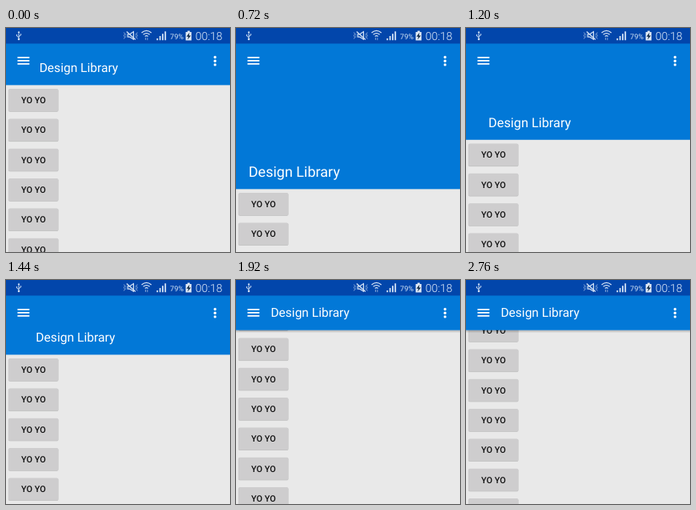
Recreate the animation shown at these times as an HTML page. Size 280 by 280 pixels, loop 2.88 s.

```html
<!DOCTYPE html>
<html lang="en">
<head>
<meta charset="utf-8">
<title>Collapsing toolbar</title>
<style>
  html, body { margin: 0; width: 100%; height: 100%; overflow: hidden; background: #e9e9e9; }
  svg { display: block; width: 100%; height: 100%; }
  text { font-family: Roboto, "Noto Sans", sans-serif; text-rendering: geometricPrecision; }
</style>
</head>
<body>
<svg viewBox="0 0 280 280">
  <defs>
    <linearGradient id="fade" x1="0" y1="0" x2="0" y2="1">
      <stop offset="0" stop-color="#000" stop-opacity=".24"/>
      <stop offset="1" stop-color="#000" stop-opacity="0"/>
    </linearGradient>
    <g id="button">
      <rect x="2.7" y="5.1" width="63" height="28.3" rx="2" fill="#000" opacity=".07"/>
      <rect x="3.1" y="5.3" width="62.2" height="28" rx="1.6" fill="#000" opacity=".13"/>
      <rect x="3.1" y="4.7" width="62.2" height="28" rx="1.6" fill="#cecdce"/>
      <text x="34.4" y="22.6" font-size="10.9" font-weight="500" text-anchor="middle" fill="#111">YO YO</text>
    </g>
  </defs>
  <rect width="280" height="280" fill="#e9e9e9"/>
  <g id="list"></g>

  <rect id="shadow" width="280" height="3.5" fill="url(#fade)"/>
  <rect id="bar" width="280" fill="#0278d7"/>
  <text id="title" fill="#fff">Design Library</text>
  <path d="M14.4 36.9H29.3M14.4 40.9H29.3M14.4 44.9H29.3" stroke="#fff" stroke-width="1.6"/>
  <g fill="#fff">
    <circle cx="261.3" cy="36.5" r="1.7"/>
    <circle cx="261.3" cy="41.2" r="1.7"/>
    <circle cx="261.3" cy="45.9" r="1.7"/>
  </g>

  <rect width="280" height="19.5" fill="#0246ab"/>
  <g fill="none" stroke="#d5e3f6" stroke-width="1">
    <!-- usb -->
    <path d="M16 5V14M16 11.8L13.4 10V8M16 10.6L18.6 9V7.2" stroke-width="1"/>
    <path d="M16 3.6L17.4 6H14.6Z" fill="#d5e3f6" stroke="none"/>
    <circle cx="16" cy="14" r="1.3" fill="#d5e3f6" stroke="none"/>
    <!-- muted, vibrating -->
    <path d="M147.4 5.5L148.6 7.5L147.4 9.5L148.6 11.5L147.4 13.5M164.2 5.5L163 7.5L164.2 9.5L163 11.5L164.2 13.5" stroke-width=".8" opacity=".8"/>
    <path d="M149.8 7V12M161.9 7V12" stroke-width=".7" opacity=".5"/>
    <path d="M152.2 7.8H154.6L159.4 4.6V14.2L154.6 11.2H152.2Z" stroke-width="1.2"/>
    <path d="M150.8 4.4L161.8 14.6" stroke-width="1.4"/>
    <!-- wifi -->
    <path d="M169.5 6Q175.6 .9 181.7 6M171.6 8.3Q175.6 5 179.6 8.3M173.7 10.4Q175.6 8.8 177.5 10.4" stroke-width="1.3"/>
    <path d="M174.4 12V15M176.8 15.2V12.2" stroke-width=".9" opacity=".7"/>
    <!-- signal -->
    <path d="M189.2 15.2V12.9M192.6 15.2V10M195.9 15.2V7.2M199.2 15.2V4.2" stroke-width="1.8"/>
  </g>
  <!-- battery -->
  <path d="M226.8 3.6H229.8V5H231.8V15.6H224.6V5H226.8Z" fill="#dfe8f5"/>
  <path d="M229.4 5.8L225.6 10.8H228L227 14.6L231 9.4H228.6Z" fill="#0b2440"/>
  <text x="205" y="13.5" font-size="9.2" fill="#d5e3f6">79%</text>
  <text x="236.8" y="14.9" font-size="13.9" font-weight="300" fill="#e6effb">00:18</text>
</svg>
<script>
const LOOP = 2880, STEP = 120;
const OPEN = 218.4, RANGE = 155.7, PITCH = 37.33, ROWS = 9;
// [time, distance dragged upwards]: first collapses the bar, then scrolls the list
const DRAG = [[0, 147], [360, 0], [960, 39], [1440, 125], [1920, 188],
              [2160, 190], [2400, 186], [2760, 174], [LOOP, 147]];

const $ = id => document.getElementById(id);
const list = $('list'), bar = $('bar'), shadow = $('shadow'), title = $('title');
const lerp = (a, b, k) => a + (b - a) * k;

for (let i = 0; i < ROWS; i++) {
  const use = document.createElementNS('http://www.w3.org/2000/svg', 'use');
  use.setAttribute('href', '#button');
  use.setAttribute('y', i * PITCH);
  list.append(use);
}

// Monotone cubic through the drag points, closed over the loop
const spans = DRAG.length - 1;
const slope = DRAG.slice(1).map(([t, d], i) => (d - DRAG[i][1]) / (t - DRAG[i][0]));
const tangent = i => {
  const a = slope[(i + spans - 1) % spans], b = slope[i % spans];
  return a * b > 0 ? 2 * a * b / (a + b) : 0;
};

function dragAt(t) {
  let i = 0;
  while (i < spans - 1 && t >= DRAG[i + 1][0]) i++;
  const [t0, d0] = DRAG[i], [t1, d1] = DRAG[i + 1];
  const w = t1 - t0, u = (t - t0) / w, v = 1 - u;
  return d0 * (1 + 2 * u) * v * v + d1 * (3 - 2 * u) * u * u
       + w * u * v * (tangent(i) * v - tangent(i + 1) * u);
}

function draw(t) {
  const drag = dragAt(t);
  const shift = Math.min(drag, RANGE);
  const bottom = OPEN - shift, k = shift / RANGE;
  bar.setAttribute('height', bottom);
  // The bar is raised only while fully collapsed
  shadow.setAttribute('y', bottom);
  shadow.setAttribute('opacity', k < 1 ? 0 : 1);
  list.setAttribute('transform', `translate(0 ${OPEN - drag})`);
  title.setAttribute('x', lerp(12.4, 43.4, k));
  title.setAttribute('y', lerp(203, 46.4, k));
  title.setAttribute('font-size', lerp(18.67, 15.55, 1 - (1 - k) ** 2));
}

const start = performance.now();
function tick() {
  const t = (performance.now() - start) % LOOP;
  draw(Math.floor(t / STEP) * STEP);
  requestAnimationFrame(tick);
}
tick();
</script>
</body>
</html>
```
